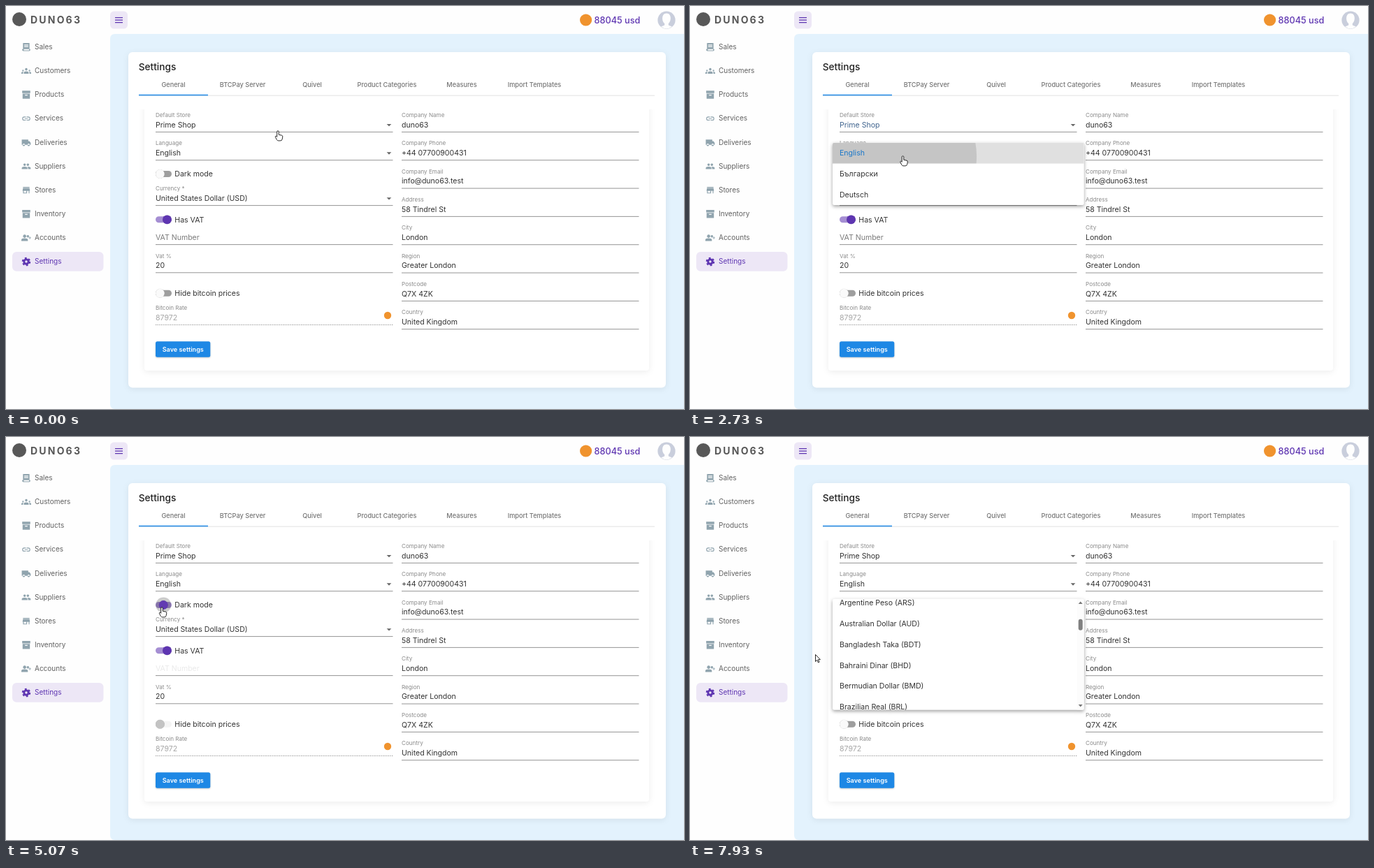
Animation, 970 px wide and 577 px high, one loop 8000 ms. Source, as an HTML page:

```html
<!DOCTYPE html>
<html lang="en">
<head>
<meta charset="utf-8">
<title>Settings</title>
<style>
  :root {
    --page: #fefefe; --main: #e3f2fd; --card: #fff; --title: #222; --tab: #757575;
    --value: #333; --input: #333; --label: #8a8a8a; --line: #949494; --rule: #e2e2e2;
    --nav: #616161; --icon: #90a4ae; --logo: #585858; --rate: #a6a6a6; --total: #5e35b1;
    --arrow: #666; --shadow: rgba(0, 0, 0, .07);
  }
  .dark {
    --page: #2a2c35; --main: #111; --card: #2a2c35; --title: #ececee; --tab: #c2c3c7;
    --value: #f6f6f6; --input: #8b8c91; --label: #d6d6d9; --line: #808186; --rule: #41434b;
    --nav: #8b8d94; --icon: #98999d; --logo: #5d5f66; --rate: #a3a4a8; --total: #fff;
    --arrow: #f6f6f6; --shadow: rgba(0, 0, 0, .1);
  }
  html, body { margin: 0; width: 100%; height: 100%; overflow: hidden; }
  svg { display: block; width: 100vw; height: 100vh; }
  text { font: 10.55px Inter, sans-serif; fill: var(--value); white-space: pre; }
  .nav { font-size: 10px; fill: var(--nav); }
  .on { fill: #5e35b1; }
  .title { font-size: 13.7px; font-weight: 500; fill: var(--title); }
  .tab { font-size: 9.2px; font-weight: 500; fill: var(--tab); text-anchor: middle; }
  .label { font-size: 8.1px; fill: var(--label); }
  .input { fill: var(--input); }
  .rate { fill: var(--rate); }
  .total { font-size: 12.7px; font-weight: 500; fill: var(--total); }
  .logo { font-size: 14px; font-weight: 700; letter-spacing: 2.2px; fill: var(--logo); }
  .save { font-size: 9.1px; font-weight: 600; fill: #fff; }
  .option { fill: #333; }
  .chosen { fill: #1e88e5; }
  .line { stroke: var(--line); }
  .arrow { fill: var(--arrow); }
  .focus .line { stroke: #1e88e5; stroke-width: 2; }
  .focus .label, .focus .arrow { fill: #1e88e5; }
  .picked .value { fill: #41658f; }
  .inner, .outer { fill: var(--card); filter: drop-shadow(0 2px 4px var(--shadow)); }
  .panel { filter: drop-shadow(0 2px 2.5px rgba(0, 0, 0, .38)); }
  .icon { fill: var(--icon); fill-rule: evenodd; }
  .gear { fill: none; stroke: #5e35b1; }
</style>
</head>
<body>
<svg id="stage" viewBox="0 0 970 577" preserveAspectRatio="none"></svg>
<script>
const LOOP = 8000, ROW = 29.75, STEP = 40.33, LEFT = 214, RIGHT = 566;

const text = (x, y, s, cls = '') => `<text x="${x}" y="${y}" class="${cls}">${s}</text>`;
const rect = (x, y, w, h, r, attrs) => `<rect x="${x}" y="${y}" width="${w}" height="${h}" rx="${r}" ${attrs}/>`;
const circle = (x, y, r, attrs) => `<circle cx="${x}" cy="${y}" r="${r}" ${attrs}/>`;
const path = (d, attrs = '') => `<path d="${d}" ${attrs}/>`;

// Icons on a 24 unit grid
const head = (x, y, r) => `M${x} ${y - r}a${r} ${r} 0 1 0 .01 0z`;
const box = path('M2 2h20v6H2zM3 9.3h18V22H3zM9 12v2h6v-2z');
const icons = {
  Sales: path('M4 2h16v15h2v2q0 3-3 3H5q-3 0-3-3v-2h2zM7 6v2h10V6zM7 10v2h10v-2zM6 17v3h13v-3z'),
  Customers: path(head(12, 8, 3) + head(4, 11, 2) + head(20, 11, 2) +
    'M6 19v-2q0-4 6-4t6 4v2zM0 19v-2q0-3 5-3-1 2-1 5zM24 19v-2q0-3-5-3 1 2 1 5z'),
  Products: box,
  Services: path('M11 8H7a4 4 0 0 0 0 8h4M13 8h4a4 4 0 0 1 0 8h-4M8 12h8',
    'fill="none" stroke="var(--icon)" stroke-width="2"'),
  Deliveries: path('M1 5h16v4h3l3 4v5h-2H1z' + head(6, 18, 3) + head(18, 18, 3), 'fill-rule="nonzero"'),
  Suppliers: path(head(8, 8, 3) + head(16, 8, 3) +
    'M1 19v-2.5q0-3.5 7-3.5t7 3.5V19zM16.5 19q.3-4-1.5-6 8 0 8 3.5V19z'),
  Stores: path('M4 4h16v2H4zM4 7h16l1 5v2h-1v6h-2v-6h-4v6H4v-6H3v-2zM6 14v4h6v-4z'),
  Inventory: box,
  Accounts: path(head(8, 8, 4) + head(16, 8, 3) +
    'M0 20v-3q0-4 8-4t8 4v3zM20 9h1.7v2H24v1.7h-2.3V15H20v-2.3h-2V11h2z'),
  Settings: `<g class="gear">${circle(12, 12, 5.5, 'stroke-width="5"')}${
    circle(12, 12, 9, 'stroke-width="3.6" stroke-dasharray="4.7 4.725"')}</g>`,
};

const sidebar = Object.entries(icons).map(([name, icon], i) => {
  const y = 58.5 + i * 34.15, active = name === 'Settings';
  return (active ? rect(9, 352, 130.5, 27.8, 6, 'fill="#ede7f6"') : '') +
    `<g class="icon" transform="translate(22 ${y - 6.7}) scale(.58)">${icon}</g>` +
    text(41, y + 3.5, name, active ? 'nav on' : 'nav');
}).join('');

const tabs = [[239.5, 'General'], [338.5, 'BTCPay Server'], [438, 'Quivel'],
  [545, 'Product Categories'], [652, 'Measures'], [756, 'Import Templates']]
  .map(([x, s]) => text(x, 116.2, s, 'tab')).join('');

function field(x, y, label, value, cls = 'input', attrs = '') {
  return text(x, y - 21.3, label, 'label') + text(x, y - 6.8, value, cls) +
    path(`M${x} ${y}h339.5`, `class="line" ${attrs}`);
}
const select = (id, y, label, value) => `<g id="${id}">${field(LEFT, y, label, value, 'value')}${
  path(`M544.7 ${y - 11.4}h6.6l-3.3 3.3z`, 'class="arrow"')}</g>`;

const toggle = (id, y, label) => `<g id="${id}">${rect(214, y - 4.5, 23, 9, 4.5, '')}${
  circle(220.4, y, 0, 'class="ripple" fill="#000"')}${
  circle(220.4, y, 6.4, 'class="thumb" style="filter:drop-shadow(0 .6px .7px rgba(0,0,0,.3))"')}</g>` +
  text(241.3, y + 3.7, label, 'input');

const company = [['Company Name', 'duno63'], ['Company Phone', '+44 07700900431'],
  ['Company Email', 'info@duno63.test'], ['Address', '58 Tindrel St'], ['City', 'London'],
  ['Region', 'Greater London'], ['Postcode', 'Q7X 4ZK'], ['Country', 'United Kingdom']]
  .map(([label, value], i) => field(RIGHT, 180.4 + i * STEP, label, value)).join('');

// Drop-down panels: options, selected row, life span and the click ripple
const panels = [
  { id: 'store', top: 155.8, options: ['Prime Shop'], chosen: 0,
    open: 390, close: 1110, ripple: { x: 389.5, y: 179, size: 187, start: 949 } },
  { id: 'language', top: 195.8, options: ['English', 'Български', 'Deutsch'], chosen: 0,
    open: 1860, close: 2840, ripple: { x: 305, y: 215, size: 258, start: 2695 } },
  { id: 'currency', top: 231.8, height: 159, chosen: 1, open: 6060, close: 1e9,
    options: ['Bitcoin (BTC)', 'United States Dollar (USD)', 'Euro (EUR)', 'Pound Sterling (GBP)',
      'Bulgarian lev (BGN)', 'United Arab Emirates Dirham (AED)', 'Argentine Peso (ARS)',
      'Australian Dollar (AUD)', 'Bangladesh Taka (BDT)', 'Bahraini Dinar (BHD)',
      'Bermudian Dollar (BMD)', 'Brazilian Real (BRL)', 'Canadian Dollar (CAD)'] },
];

function panelMarkup({ id, top, options, chosen, ripple, height = options.length * ROW }) {
  const rows = options.map((s, i) =>
    text(LEFT, top + (i + .5) * ROW + 3.6, s, i === chosen ? 'option chosen' : 'option')).join('');
  const chosenRow = attrs => rect(204, top + chosen * ROW, 359.7, ROW, 0, attrs);
  const bar = ripple ? '' : rect(553.7, top, 10, height, 0, 'fill="#fcfcfc"') +
    path('M555.7 239h6l-3-3.4zM555.7 383h6l-3 3.4z', 'fill="#777"') +
    rect(555.7, 241.5, 6, 16, 3, 'id="scrollThumb" fill="#808080"');
  return `<clipPath id="${id}Clip">${rect(204, top, 359.7, height, 2.5, '')}</clipPath>
    <clipPath id="${id}RowClip">${chosenRow('')}</clipPath>
    <g id="${id}Panel" class="panel">${rect(204, top, 359.7, height, 2.5, 'fill="#fff"')}
    <g clip-path="url(#${id}Clip)"><g class="rows">
    ${chosenRow('fill="#e0e0e0"')}
    ${ripple ? '' : rect(204, top, 359.7, ROW, 0, 'id="hover" fill="#f3f3f3"')}${rows}
    ${ripple ? circle(ripple.x, ripple.y, 0,
      `class="ripple" fill="#000" opacity=".12" clip-path="url(#${id}RowClip)"`) : ''}
    </g>${bar}</g></g>`;
}

stage.innerHTML = `
  <rect width="970" height="577" fill="var(--page)"/>
  ${circle(19, 19, 10, 'fill="var(--logo)"')}
  ${text(35, 24.8, 'DUNO63', 'logo')}
  ${rect(149, 7.5, 25, 25, 5.5, 'fill="#ede7f6"')}
  ${path('M156 16.7h11M156 20.2h11M156 23.7h11', 'stroke="#5e35b1" stroke-width="1.3"')}
  ${circle(829.6, 20, 8.6, 'fill="#f0932e"')}
  ${text(841.5, 24.5, '88045 usd', 'total')}
  ${circle(945, 20.2, 12.6, 'fill="#c9cedc"')}
  ${path('M945 10.5c7.5 0 7 11.5 2.8 14.5v2.5l5 2q-7.8 6-15.6 0l5-2V25c-4.2-3-4.7-14.5 2.8-14.5z', 'fill="var(--page)"')}
  ${sidebar}
  ${path('M970 40H156q-7 0-7 7v523q0 7 7 7h814z', 'fill="var(--main)"')}
  ${rect(175, 66, 769, 480.5, 6, 'class="outer"')}
  ${rect(198, 139, 722, 383, 4, 'class="inner"')}
  ${rect(190, 128, 738, 20, 0, 'fill="var(--card)"')}
  ${text(189.7, 92.2, 'Settings', 'title')}
  ${tabs}
  ${path('M190 128.2h738', 'stroke="var(--rule)"')}
  ${path('M190 127.4h99', 'stroke="#1e88e5" stroke-width="1.5"')}
  ${select('store', 180.4, 'Default Store', 'Prime Shop')}
  ${select('language', 180.4 + STEP, 'Language', 'English')}
  ${toggle('darkMode', 240.5, 'Dark mode')}
  ${select('currency', 285.6, 'Currency *', 'United States Dollar (USD)')}
  ${toggle('hasVat', 305.8, 'Has VAT')}
  ${field(LEFT, 341.6, '', '<tspan id="vat">VAT Number</tspan>')}
  ${field(LEFT, 381.8, 'Vat %', '20')}
  ${toggle('hidePrices', 411.2, 'Hide bitcoin prices')}
  ${field(LEFT, 456.5, 'Bitcoin Rate', '87972', 'rate', 'stroke-dasharray="1.3 1.3"')}
  ${circle(546, 443, 5.2, 'fill="#f0932e"')}
  ${company}
  ${rect(214, 480.3, 78.3, 22.5, 2.5, 'fill="#1e88e5" style="filter:drop-shadow(0 1px 1px rgba(0,0,0,.2))"')}
  ${text(223.7, 494.8, 'Save settings', 'save')}
  ${panels.map(panelMarkup).join('')}
  <g id="cursor" fill="#fff" stroke="#111" stroke-width=".9" stroke-linejoin="round">
    ${path('M4 .8q1.3 0 1.3 1.3v4.2l4.2.9q1.5.4 1.3 2l-.6 3.4q-.4 2.3-2.6 2.3h-3q-1.4 0-2.2-1.4L.4 9.6q-.4-1.1.6-1.3 1-.1 1.7 1V2.1q0-1.3 1.3-1.3z', 'id="hand"')}
    ${path('M.5.5v10l2.3-2.2 1.6 3.6 1.6-.7-1.6-3.5h3z', 'id="pointer"')}
  </g>`;

// Motion
const clamp = x => Math.min(1, Math.max(0, x));
const smooth = x => x * x * (3 - 2 * x);
const linear = x => x;
const decelerate = x => 1 - (1 - clamp(x)) ** 3;
const lerp = (a, b, u) => a + (b - a) * u;

// Keys are [time, value, value...]
function track(keys, t, ease = smooth) {
  const next = keys.findIndex(k => k[0] > t);
  if (next <= 0) return keys.at(next).slice(1);
  const a = keys[next - 1], b = keys[next], u = ease((t - a[0]) / (b[0] - a[0]));
  return a.slice(1).map((v, i) => lerp(v, b[i + 1], u));
}

const cursorKeys = [[0, 385, 178], [1340, 385, 178], [1470, 296.5, 220], [1640, 296.5, 220],
  [1730, 300.5, 214], [3010, 300.5, 214], [3190, 160, 241], [3330, 230.5, 242], [3420, 230.5, 242],
  [3480, 226, 242], [3770, 226, 242], [3880, 219, 243], [5560, 219, 243], [5900, 216.5, 278],
  [6430, 216.5, 278], [6530, 320, 312], [6680, 320, 312], [6770, 317, 322], [7680, 317, 322], [7920, 179, 311]];
const scrollKeys = [[0, 0], [6700, 0], [7060, 62.4], [7110, 62.4], [7420, 124.8], [7580, 124.8], [7860, 187.4]];
const switchKeys = [[0, 0], [4040, 0], [4120, 1], [5030, 1], [5110, 0]];
const tintKeys = [[0, 0], [4050, 0], [4330, 1], [5045, 1], [5330, 0]];

const rgba = (from, to, u) => `rgba(${from.map((v, i) => lerp(v, to[i], u))})`;
const find = (id, selector) => document.querySelector(`#${id} ${selector}`);
const set = (node, attrs) => Object.entries(attrs).forEach(([k, v]) => node.setAttribute(k, v));

function paintToggle(id, on, tint) {
  const off = [lerp(0, 255, tint), lerp(0, 255, tint), lerp(0, 255, tint), lerp(.38, .5, tint)];
  const shade = lerp(250, 189, tint), purple = clamp(on * 2);
  set(find(id, 'rect'), { fill: rgba(off, [94, 53, 177, .56], purple) });
  set(find(id, '.thumb'), {
    cx: lerp(220.4, 230.5, on), fill: rgba([shade, shade, shade, 1], [94, 53, 177, 1], purple),
  });
}

function paintPanel({ id, top, open, close, ripple }, t) {
  const panel = document.getElementById(id + 'Panel');
  const shown = decelerate((t - open) / 130);
  const opacity = shown * (1 - clamp((t - close) / 90));
  panel.style.display = opacity > 0 ? '' : 'none';
  set(panel, { opacity, transform: `translate(0 ${top}) scale(1 ${.8 + .2 * shown}) translate(0 ${-top})` });
  if (ripple) set(find(id + 'Panel', '.ripple'), { r: ripple.size * decelerate((t - ripple.start) / 225) });
}

function paint(t) {
  stage.classList.toggle('dark', t >= 4065 && t < 5065);
  store.classList.toggle('focus', t >= 1110 && t < 1870);
  store.classList.toggle('picked', t >= 1110 && t < 4065);
  language.classList.toggle('focus', t >= 2840 && t < 4040);

  const [on] = track(switchKeys, t), [tint] = track(tintKeys, t, linear);
  paintToggle('darkMode', on, tint);
  paintToggle('hasVat', 1, tint);
  paintToggle('hidePrices', 0, tint);
  const press = t - (t < 5000 ? 4035 : 5035);
  set(find('darkMode', '.ripple'), {
    cx: lerp(220.4, 230.5, on), r: press < 0 ? 0 : 12.5 * decelerate(press / 70),
    opacity: .2 * (1 - clamp((press - 90) / 200)),
  });
  vat.style.fill = rgba([0, 0, 0, .52], [255, 255, 255, .95], tint);

  panels.forEach(p => paintPanel(p, t));
  const [scroll] = track(scrollKeys, t);
  set(find('currencyPanel', '.rows'), { transform: `translate(0 ${-scroll})` });
  set(scrollThumb, { y: 241.5 + scroll * .103 });

  // The highlighted row lags behind the scrolling list
  const [, lateY] = track(cursorKeys, t - 150), [lateScroll] = track(scrollKeys, t - 150);
  const row = Math.floor((lateY + 1 - 231.8 + lateScroll) / ROW);
  const [x, y] = track(cursorKeys, t);
  set(hover, { y: 231.8 + row * ROW, visibility: row === 1 || x < 204 ? 'hidden' : 'inherit' });

  set(cursor, { transform: `translate(${x} ${y})` });
  hand.style.display = x < 204 ? 'none' : '';
  pointer.style.display = x < 204 ? '' : 'none';
}

function frame() {
  paint(performance.now() % LOOP);
  requestAnimationFrame(frame);
}
frame();
</script>
</body>
</html>
```
